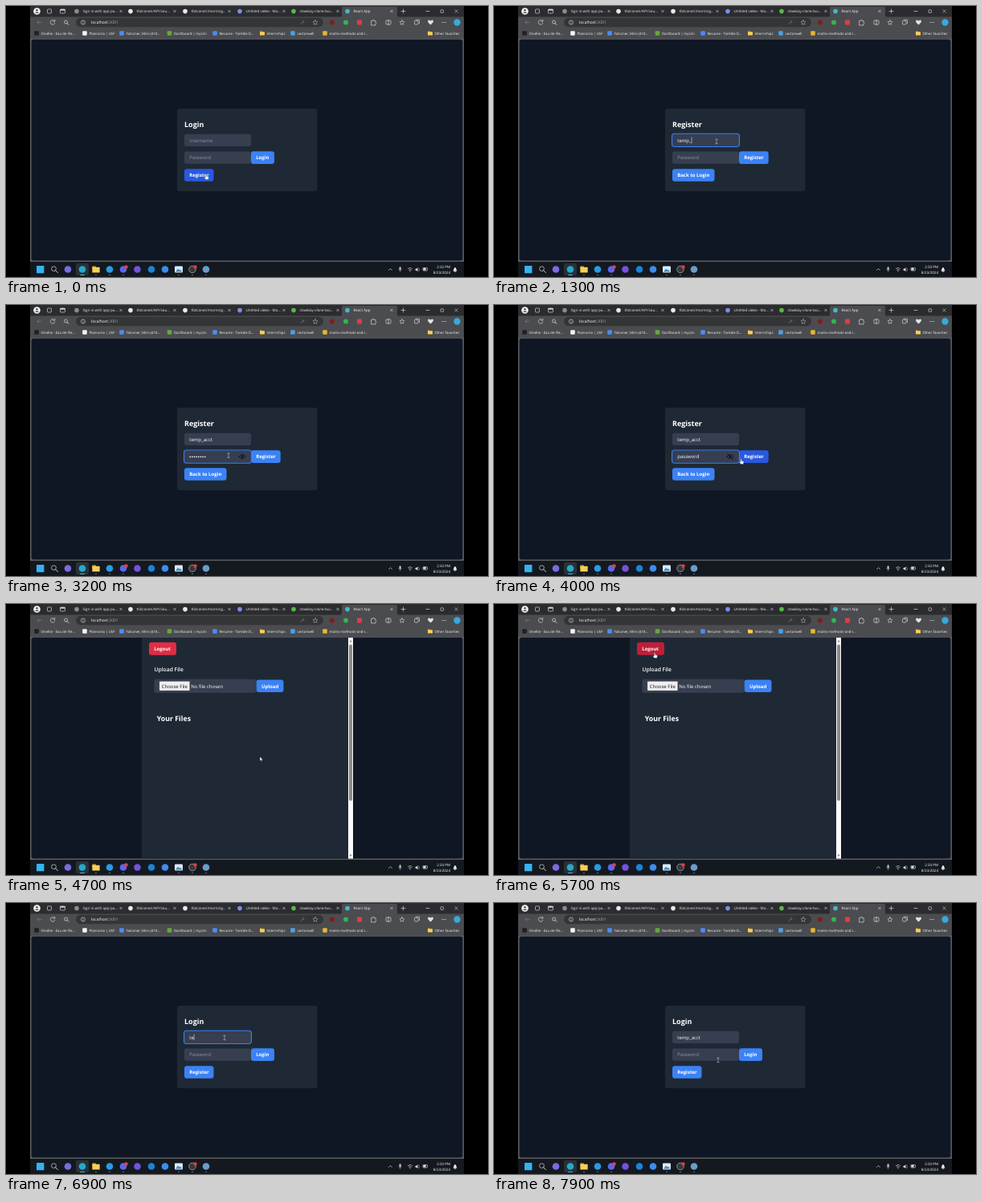
An HTML page that plays this animation: 600 px wide and 338 px high, repeating every 8000 ms.

```html
<!DOCTYPE html>
<html lang="en">
<head>
<meta charset="utf-8">
<title>Login demo</title>
<style>
  html, body { margin: 0; width: 100%; height: 100%; overflow: hidden; background: #000; }
  svg { display: block; width: 100vw; height: 100vh; }
  text { font-family: "Open Sans", "Noto Sans", sans-serif; text-rendering: geometricPrecision; white-space: pre; }
</style>
</head>
<body>
<svg viewBox="0 0 600 338"><g id="browser"></g><g id="page"></g><g id="clock"></g><g id="pointer"></g></svg>
<script>
const LOOP = 8000;
const USER = "temp_acct", PASSWORD = "password";
const BLUE = "#3b82f6", BLUE_HOVER = "#2859e0", PANEL = "#1f2935", FIELD = "#363e50", CHROME = "#4b4c4f";

const $ = id => document.getElementById(id);
const rect = (x, y, w, h, fill, r = 0, extra = "") =>
  `<rect x="${x}" y="${y}" width="${w}" height="${h}" rx="${r}" fill="${fill}" ${extra}/>`;
const dot = (x, y, r, fill) => `<circle cx="${x}" cy="${y}" r="${r}" fill="${fill}"/>`;
const ring = (x, y, r, color) => `<circle cx="${x}" cy="${y}" r="${r}" fill="none" stroke="${color}" stroke-width=".7"/>`;
const box = (x, y, w, h) => rect(x, y, w, h, "none", 0.8, 'stroke="#d4d4d4" stroke-width=".7"');
const line = (d, color = "#d4d4d4", width = 0.7) =>
  `<path d="${d}" fill="none" stroke="${color}" stroke-width="${width}" stroke-linecap="round" stroke-linejoin="round"/>`;
const shape = (d, fill, extra = "") => `<path d="${d}" fill="${fill}" ${extra}/>`;
const text = (x, y, str, size, fill = "#fff", weight = 400, anchor = "start") =>
  `<text x="${x}" y="${y}" font-size="${size}" fill="${fill}" font-weight="${weight}" text-anchor="${anchor}">${str}</text>`;
const cross = (x, y, r) => line(`M${x - r} ${y - r}l${2 * r} ${2 * r}m0 ${-2 * r}l${-2 * r} ${2 * r}`, "#ddd", 0.6);
const star = (x, color) =>
  line(`M${x} 17.5l.9 2 2.1.2-1.6 1.5.5 2.1-1.9-1.1-1.9 1.1.5-2.1-1.6-1.5 2.1-.2z`, color, 0.6);
const folder = (x, y, s = 1) =>
  rect(x - 3 * s, y - 2.6 * s, 3 * s, 2 * s, "#d99a1e", 0.4) + rect(x - 3 * s, y - 1.8 * s, 6 * s, 4.4 * s, "#f7cf55", 0.5);
const lens = (x, y, r) => ring(x, y, r, "#ddd") + line(`M${x + r * .7} ${y + r * .7}l${r} ${r}`, "#ddd", 0.9);

function tabStrip() {
  const tabs = [
    [88, "Sign in with app pa·", "#8b8b8b"],
    [155, "tfalconeri/API-Sou·", "#e8e8e8"],
    [223, "tfalconeri/morning·", "#e8e8e8"],
    [291, "Untitled video - Ma·", "#7d8cf0"],
    [358, "stowbay-clone-bui·", "#57b947"],
    [425, "React App", "#49b5d0"],
  ];
  return rect(30, 0, 540, 13.5, "#2b2c2f") +
    shape("M416 14q2 0 2-2V3q0-2 2-2h65q2 0 2 2v9q0 2 2 2z", CHROME) +
    dot(38.5, 6.5, 4.3, "#f1f1f1") + dot(38.5, 5.2, 1.3, "#555") + shape("M36 9q2.5-3.5 5 0z", "#555") +
    box(51.5, 4, 5, 5) + box(67.5, 4, 6, 5) + rect(67.5, 4, 6, 1.8, "#ccc", 0.6) +
    tabs.map(([x, label, color]) =>
      dot(x, 6.6, 2.8, color) + text(x + 7.5, 8.3, label.replace("·", "…"), 4.5, "#f0f0f0", 500) +
      cross(x + 55, 6.5, 1.3)).join("") +
    line("M492 6.5h5m-2.5-2.5v5") + line("M523 6.5h4") + box(541, 4.8, 3.6, 3.6) + cross(560.5, 6.5, 1.7);
}

function toolbar() {
  const faded = "#777";
  return rect(30, 13, 540, 306, CHROME) +
    line("M44 20.5h-5m2-2l-2 2 2 2", faded) +
    line("M60.3 18.6a2.8 2.8 0 1 0 .5 2.7m0-4v2h-2") + lens(74.5, 20, 2) +
    rect(87, 14.8, 308, 11.4, "#343537", 5.7) +
    ring(96, 20.5, 2.6, "#ccc") + line("M96 20.3v1.4m0-2.7v.1", "#ccc", 0.6) +
    text(106, 22.3, 'localhost<tspan fill="#aaa">:3001</tspan>', 5, "#fff", 500) +
    line("M367 22.5q1-3 4-3m-1.5-1.5l1.5 1.5-1.5 1.5", faded) + star(385, "#aaa") +
    dot(406, 20.5, 3.1, "#801d20") + dot(423, 20.5, 3, "#32b553") + rect(437, 17.6, 6, 6, "#e23b49", 1) +
    line("M455 18.5h1.5q0-2 1.5-1t.5 1h1.5v2q2 .5 0 2v1.5h-5z") +
    box(473, 18, 6, 5) + line("M476 17.3v6.4") + star(493, "#d4d4d4") +
    box(508.5, 18.5, 4.5, 4.5) + line("M510 17.2h4.5v4.5") +
    shape("M528.5 23.6l-3-3q-1.2-2.7 1.2-3l1.8 1 1.8-1q2.4.3 1.2 3z", "#e2e2e2") +
    [543, 545, 547].map(x => dot(x, 20.5, 0.55, "#eee")).join("") +
    dot(561.5, 20.5, 4.2, "#37a9dc");
}

function bookmarks() {
  const items = [
    [38, "Orvélie - Eau de Fle...", "#202124"],
    [98, "Plannoria | USF", "#eef4f8"],
    [144, "Falconer, Miro (418...", "#4a8df6"],
    [203.5, "Dashboard | myUni", "#64a83d"],
    [260, "Resume - Tomble D...", "#4a8df6"],
    [319, "Internships"],
    [357, "Lectorwell", "#4b9fe8"],
    [397, "matrix-methods-and-i...", "#e7b52f"],
    [528, "Other favorites"],
  ];
  return items.map(([x, label, color]) =>
    (color ? rect(x - 2.8, 31.2, 5.6, 5.6, color, 1) : folder(x, 34)) +
    text(x + 5.4, 35.7, label, 4.4, "#f4f4f4", 500)).join("");
}

function taskbar() {
  const y = 328.5;
  const marks = [
    [77, "#7c6be0"], [95, "#25a9c9"], [129, "#289be5"], [146, "#5966ee"],
    [163.5, "#7652dc"], [181, "#1c83d8"], [198, "#3d8cf0"], [232, "#34373c"], [249, "#6a9dc8"],
  ];
  return rect(30, 319, 540, 19, "#141920") +
    rect(87, 321, 16, 15, "#293138", 2) +
    rect(38, y - 4.6, 9.4, 9.4, "#35b3f2", 0.6) + lens(59.5, 327.7, 2.9) + folder(112, y, 1.55) +
    marks.map(([x, color]) => dot(x, y, 4.3, color)).join("") +
    rect(210, 324.5, 10, 8, "#dcebf5", 1) + shape("M211 331.5l3-4 2 2 1.2-1 2 3z", "#3c8ec4") +
    ring(232, y, 4.3, "#bbb") + dot(149.5, 325.5, 2.2, "#e04343") + dot(235.5, 325.5, 2.2, "#e53942") +
    [112, 129, 146, 215, 232, 249].map(x => rect(x - 1.2, 335, 2.4, 0.8, "#888", 0.4)).join("") +
    rect(92, 335, 6, 0.9, "#55b9ed", 0.4) +
    line("M476.5 329.5l2-2 2 2") +
    rect(489.6, 325.2, 2, 4, "#ccc", 1) + line("M488.6 328.5q2 3 4 0m-2 1.5v1.5", "#ccc", 0.5) +
    line("M500.5 327.5q2.5-2.4 5 0m-4 1.6q1.5-1.4 3 0") + dot(503, 330.7, 0.6, "#ddd") +
    shape("M509.5 327.7h1.3l1.7-1.5v5l-1.7-1.5h-1.3z", "#ddd") + line("M514 327q1.2 1.7 0 3.4", "#ddd", 0.5) +
    box(519, 326.5, 5.5, 3.6) + rect(519.5, 327, 3.2, 2.6, "#ddd") +
    shape("M556.5 330.7q1-1 1-3 1.5-3.2 3 0 0 2 1 3z", "#eee") + dot(559, 331.4, 0.7, "#eee");
}

// Pointer path: time, x, y
const PATH = [
  [0, 249, 210], [400, 249, 210], [800, 277, 169], [1900, 277, 169], [2200, 277, 187.5],
  [3250, 277, 187.5], [3500, 294, 189], [3800, 294, 189], [4000, 307.5, 192], [4250, 307.5, 192],
  [4600, 316, 190.5], [5100, 316, 190.5], [5600, 200, 61], [6100, 200, 61], [6600, 272, 168],
  [7500, 272, 168], [7800, 279, 196], [LOOP, 279, 196],
];
function pointerAt(t) {
  const i = PATH.findIndex(p => p[0] > t);
  const [t0, x0, y0] = PATH[i - 1], [t1, x1, y1] = PATH[i];
  const p = (t - t0) / (t1 - t0), e = p * p * (3 - 2 * p);
  return { x: x0 + (x1 - x0) * e, y: y0 + (y1 - y0) * e, kind: "arrow" };
}

function drawPointer({ x, y, kind }) {
  const outline = 'stroke="#222" stroke-width=".4" stroke-linejoin="round"';
  const body = {
    arrow: shape("M0 0v5.2l1.2-1.1.9 1.9.9-.4-.9-1.9h1.7z", "#fff", outline),
    hand: shape("M-.7 0q.7-.8 1.4 0v2.2l2.2.6q.8.3.6 1.2l-.6 2.4h-3.3l-2-2.5q.2-1 1.7 0z", "#fff", outline),
    text: line("M-1.2-2.7h2.4M0-2.7v5.4m-1.2 0h2.4", "#b9bec8", 0.6),
  }[kind];
  return `<g transform="translate(${x} ${y})">${body}</g>`;
}

const measure = document.createElement("canvas").getContext("2d");
function textWidth(str) {
  measure.font = '60px "Open Sans", "Noto Sans", sans-serif';
  return measure.measureText(str).width / 10;
}

const inside = (m, x, y, w, h) => m.x >= x && m.x <= x + w && m.y >= y && m.y <= y + h;

// Widgets react to the pointer: buttons darken, and both set its kind.
function button(m, x, y, w, label, h = 15.6, color = BLUE, hover = BLUE_HOVER) {
  const over = inside(m, x, y, w, h);
  if (over) m.kind = "hand";
  return rect(x, y, w, h, over ? hover : color, 3) + text(x + 6.2, y + h / 2 + 2.2, label, 6, "#fff", 700);
}

function field(m, y, placeholder, value, focused, dots = false, caret = false) {
  const x = 222, w = 83, h = 15.4;
  if (inside(m, x, y, w, h)) m.kind = "text";
  const content = dots
    ? [...value].map((_, i) => dot(229.3 + i * 2.65, y + 8, 0.8, "#fff")).join("")
    : text(228.3, y + 9.9, value || placeholder, 6, value ? "#fff" : "#8d95a3");
  const end = 228.6 + textWidth(value);
  const halo = rect(x - 0.45, y - 0.45, w + 0.9, h + 0.9, "none", 3.2, `stroke="${BLUE}" stroke-width="1.1"`);
  return rect(x, y, w, h, FIELD, 2.8) + (focused ? halo : "") + content +
    (caret ? line(`M${end} ${y + 4.2}v7`, "#fff", 0.5) : "");
}

function eye(slashed) {
  return line("M290 189q4-5 8 0-4 5-8 0z", "#10141b", 0.9) + dot(294, 189, 1.4, "#10141b") +
    (slashed ? line("M290.5 185.5l7 7", "#10141b", 0.9) : "");
}

// Number of characters typed when the first appears at start.
const typed = (t, start, step) => Math.max(0, 1 + Math.floor((t - start) / step));

function authPage(m, t) {
  const registering = t < 4250 && t >= 300;
  const revealed = t >= 3650;
  let userCount, passCount = 0, userFocus, passFocus = false;
  if (registering) {
    userCount = t < 1500 ? Math.min(5, typed(t, 1000, 75)) : 5 + typed(t, 1500, 60);
    passCount = typed(t, 2400, 100);
    userFocus = t >= 800 && t < 2150;
    passFocus = t >= 2150;
  } else {
    userCount = typed(t, 6800, 80);
    userFocus = t >= 6650 && t < 7750;
  }
  const user = USER.slice(0, userCount), password = PASSWORD.slice(0, passCount);
  const action = registering ? "Register" : "Login";
  return rect(213, 128, 174.5, 103, PANEL, 3) +
    text(222, 150.6, action, 9, "#fff", 700) +
    button(m, 305, 181.3, registering ? 36.7 : 29, action) +
    button(m, 222, 203.2, registering ? 52.5 : 36.5, registering ? "Back to Login" : "Register") +
    field(m, 159.7, "Username", user, userFocus, false, userFocus) +
    field(m, 181.4, "Password", password, passFocus, !revealed && passCount > 0) +
    (password ? eye(revealed) : "");
}

function filesPage(m) {
  return rect(169, 42, 257, 275.6, PANEL) +
    button(m, 178, 47.8, 34, "Logout", 16, "#e02d45", "#be1f38") +
    text(184.5, 84.4, "Upload File", 6.75, "#fff", 600) +
    rect(184.5, 93.8, 127, 17, FIELD, 2.8) +
    rect(191, 96.5, 37.7, 11.5, "#efefef", 0.8, 'stroke="#777" stroke-width=".4"') +
    text(209.8, 104.5, "Choose File", 6, "#111", 400, "middle") +
    text(230.3, 104.5, "No file chosen", 6) +
    button(m, 311.7, 94.5, 33.8, "Upload") +
    text(187.7, 146.3, "Your Files", 8.8, "#fff", 700) +
    rect(426, 42, 6, 275.6, "#fafafa") + rect(427, 50.5, 4, 195, "#8b8b8b", 2) +
    shape("M427.4 47.3l1.6-2.4 1.6 2.4z", "#777") + shape("M427.4 312.7l1.6 2.4 1.6-2.4z", "#777");
}

function render(t) {
  const mouse = pointerAt(t);
  $("page").innerHTML = t >= 4250 && t < 5750 ? filesPage(mouse) : authPage(mouse, t);
  $("clock").innerHTML = text(553, 326.8, t < 1100 ? "2:32 PM" : "2:33 PM", 4.5, "#fff", 500, "end") +
    text(553, 333.6, "8/23/2024", 4.5, "#fff", 500, "end");
  $("pointer").innerHTML = drawPointer(mouse);
}

$("browser").innerHTML = toolbar() + tabStrip() + bookmarks() +
  rect(30, 40.8, 540, 278.2, "#5c5d60") + rect(31.6, 41.8, 536.8, 275.8, "#101724", 2.5) + taskbar();

const start = performance.now();
function tick() {
  render((performance.now() - start) % LOOP);
  requestAnimationFrame(tick);
}
tick();
</script>
</body>
</html>
```
